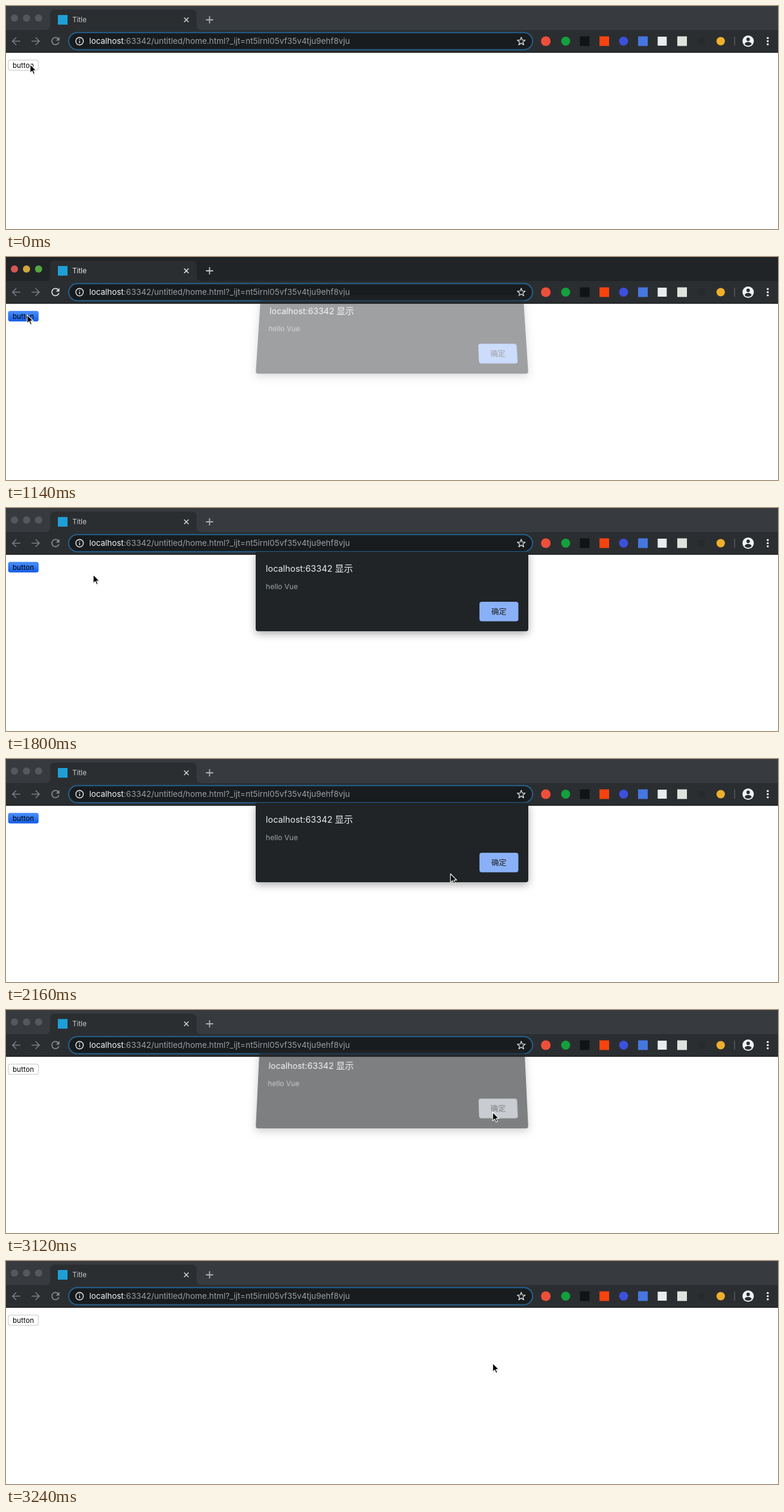
Recreate the animation shown at these times as an HTML page. Size 1280x371 px, loop 3300 ms.

```html
<!DOCTYPE html>
<html lang="zh-CN">
<head>
<meta charset="utf-8">
<title>Title</title>
<style>
  html, body { margin: 0; width: 100%; height: 100%; overflow: hidden; background: #fff; }
  svg { position: absolute; left: 0; top: 0; display: block; overflow: visible; }
  text { font-family: Inter, "Noto Sans CJK SC", "Noto Sans CJK", sans-serif; white-space: pre; }
  #dialog {
    position: absolute; left: 414px; top: 73px; width: 452px; height: 132px;
    background: #202426; border-radius: 0 0 4px 4px;
    box-shadow: 0 4px 14px rgba(0, 0, 0, .34);
    transform-origin: 50% 100%;
  }
</style>
</head>
<body>
<svg width="1280" height="371" viewBox="0 0 1280 371">
  <defs>
    <linearGradient id="blue" x2="0" y2="1">
      <stop offset="0" stop-color="#4a90fb"/>
      <stop offset="1" stop-color="#155ce6"/>
    </linearGradient>
  </defs>
  <rect width="1280" height="371" fill="#fff"/>

  <rect id="strip" width="1280" height="40"/>
  <g id="lights"></g>
  <rect y="40" width="1280" height="37" fill="#2b2e31"/>
  <rect y="76.5" width="1280" height="1.3" fill="#131516"/>
  <path id="tab" d="M65 40q8 0 8-8V14q0-8 8-8H308q8 0 8 8V32q0 8 8 8Z" fill="#2b2e31"/>
  <rect x="86" y="15" width="16" height="16" fill="#1e9fd8"/>
  <text id="tabName" x="110" y="27.2" font-size="11.6">Title</text>
  <path id="close" d="M295.3 19.3l7.4 7.4m0-7.4l-7.4 7.4" stroke-width="1.5"/>
  <path id="plus" d="M331.5 23h12M337.5 17v12" stroke-width="1.8"/>

  <g fill="none" stroke="#7c8084" stroke-width="1.6">
    <path d="M23.5 58.5H11.2M17 52.3l-6.2 6.2 6.2 6.2"/>
    <path d="M42.5 58.5H54.8M49 52.3l6.2 6.2-6.2 6.2"/>
  </g>
  <g id="reload">
    <path d="M86.4 54.2A6 6 0 1 0 87.8 60" fill="none" stroke-width="1.7"/>
    <path d="M88.6 51.6v6h-6z" stroke="none"/>
  </g>

  <rect x="104" y="44.3" width="769" height="28.4" rx="14.2" fill="#191c1e" stroke="#24608e" stroke-width="2"/>
  <g stroke="#eceef0" fill="none" stroke-width="1.4">
    <circle cx="122" cy="58.5" r="6.2"/>
    <path d="M122 57.8v4M122 54.8v1.5"/>
  </g>
  <text x="138" y="63.4" font-size="13.4" fill="#9a9fa4"><tspan fill="#f3f4f5">localhost</tspan>:63342/untitled/home.html?_ijt=nt5irnl05vf35v4tju9ehf8vju</text>
  <path id="star" fill="none" stroke="#dfe1e3" stroke-width="1.3" stroke-linejoin="round"/>

  <g id="badges"></g>
  <path d="M1208 51v15" stroke="#64686c" stroke-width="1.2"/>
  <circle cx="1230.5" cy="58.5" r="9.4" fill="#f1f2f3"/>
  <g fill="#2b2e31">
    <circle cx="1230.5" cy="55.4" r="2.9"/>
    <path d="M1224.7 63.4q1-3.6 5.8-3.6t5.8 3.6q-2.2 2.6-5.8 2.6t-5.8-2.6Z"/>
  </g>
  <g fill="#eceef0">
    <circle cx="1263" cy="53.3" r="1.7"/>
    <circle cx="1263" cy="58.5" r="1.7"/>
    <circle cx="1263" cy="63.7" r="1.7"/>
  </g>

  <rect id="face" x="3.8" y="90" width="50" height="17" rx="3"/>
  <text x="11" y="102.8" font-size="11.6" fill="#000">button</text>
</svg>

<div id="dialog">
  <svg width="452" height="132" viewBox="0 0 452 132">
    <text x="16.8" y="32.8" font-size="14.4" fill="#eceef0">localhost:63342 <tspan font-size="15">显示</tspan></text>
    <text x="16.8" y="62" font-size="12.1" fill="#9da2a7">hello Vue</text>
    <rect id="ok" x="371" y="83" width="64.5" height="32.5" rx="4"/>
    <text x="403.2" y="103.8" font-size="12.5" font-weight="500" text-anchor="middle" fill="#202124">确定</text>
  </svg>
</div>

<svg width="1280" height="371" viewBox="0 0 1280 371">
  <g id="cursor">
    <path d="M0 0V14.4L3.3 11.3 5.5 16.4 7.8 15.4 5.6 10.4H10.2Z" transform="translate(0 1.4)" fill="#000" opacity=".18"/>
    <path d="M0 0V14.4L3.3 11.3 5.5 16.4 7.8 15.4 5.6 10.4H10.2Z" fill="#000" stroke="#fff" stroke-width="1.1" stroke-linejoin="round"/>
  </g>
</svg>

<script>
const LOOP = 3300, STEP = 60;
const NS = 'http://www.w3.org/2000/svg';
const $ = id => document.getElementById(id);
const clamp = v => Math.min(1, Math.max(0, v));
const span = (t, a, b) => clamp((t - a) / (b - a));
const lerp = (a, b, p) => a + (b - a) * p;
const smooth = p => p * p * (3 - 2 * p);
const mix = (a, b, p) => `rgb(${a.map((v, i) => Math.round(lerp(v, b[i], p)))})`;

function add(parent, tag, attrs) {
  const el = document.createElementNS(NS, tag);
  for (const k in attrs) el.setAttribute(k, attrs[k]);
  return parent.appendChild(el);
}

const lightColors = [[252, 86, 80], [247, 192, 46], [85, 192, 56]];
const lights = lightColors.map((c, i) => add($('lights'), 'circle', { cx: 14 + 20 * i, cy: 20, r: 6 }));

// Toolbar badges: centre x, shape, size, colour
[
  [895, 'o', 16, '#ee4f3b'], [928, 'o', 15, '#14a03c'], [959.5, 's', 16, '#111314'],
  [992, 's', 16, '#f8430f'], [1024, 'o', 15, '#3c50dc'], [1056, 's', 16, '#4677e0'],
  [1088, 's', 15, '#e9ebec'], [1121, 's', 16, '#dfe3de'], [1153, 's', 11, '#272a2d'],
  [1185, 'o', 14, '#eeb02c']
].forEach(([x, shape, d, fill]) => shape === 'o'
  ? add($('badges'), 'circle', { cx: x, cy: 58.5, r: d / 2, fill })
  : add($('badges'), 'rect', { x: x - d / 2, y: 58.5 - d / 2, width: d, height: d, fill }));

const starPoints = Array.from({ length: 10 }, (_, i) => {
  const r = i % 2 ? 2.9 : 7, a = (i / 5 - .5) * Math.PI;
  return `${(854.3 + r * Math.cos(a)).toFixed(2)} ${(59 + r * Math.sin(a)).toFixed(2)}`;
});
$('star').setAttribute('d', `M${starPoints.join('L')}Z`);

// Pointer stops: time, x, y
const stops = [
  [0, 40, 97], [840, 40, 97], [1020, 35, 96], [1680, 35, 96],
  [2160, 737, 191], [2220, 746, 189], [2760, 807, 170], [LOOP, 807, 170]
];

function pointer(t) {
  const i = stops.findIndex(s => s[0] > t);
  const [t0, x0, y0] = stops[i - 1], [t1, x1, y1] = stops[i];
  const p = smooth(span(t, t0, t1));
  return [lerp(x0, x1, p), lerp(y0, y1, p)];
}

function drawWindow(active) {
  $('strip').setAttribute('fill', mix([55, 58, 62], [26, 28, 31], active));
  lights.forEach((el, i) => el.setAttribute('fill', mix([86, 89, 92], lightColors[i], active)));
  $('tabName').setAttribute('fill', mix([203, 206, 209], [246, 247, 248], active));
  $('close').setAttribute('stroke', mix([214, 216, 218], [246, 247, 248], active));
  $('plus').setAttribute('stroke', mix([172, 175, 178], [200, 202, 205], active));
  const ink = mix([134, 137, 140], [246, 247, 248], active);
  $('reload').setAttribute('stroke', ink);
  $('reload').setAttribute('fill', ink);
}

function drawDialog(t) {
  const closing = t >= 2940;
  const u = closing ? span(t, 2940, 3220) : 1 - span(t, 1080, 1320);
  const away = u * u;
  const box = $('dialog').style;
  box.visibility = away < 1 ? 'visible' : 'hidden';
  box.opacity = 1 - away;
  // Sheet tips backwards: the top edge narrows while the whole lifts
  box.transform = away ? `translateY(${-19.4 * away}px) matrix3d(1,0,0,0, 0,${1 + .0533 * away},0,${-.00053 * away}, 0,0,1,0, 0,0,0,1)` : 'none';
  $('ok').setAttribute('fill', mix([138, 176, 247], [162, 167, 174], closing ? clamp(away / .4) : 0));
}

function draw(now) {
  const t = Math.floor((now % LOOP) / STEP) * STEP;
  drawWindow(t < 900 ? span(t, 0, 360) : 1 - span(t, 1080, 1320));
  drawDialog(t);

  const pressed = t >= 1020 && t < 3060;
  $('face').setAttribute('fill', pressed ? 'url(#blue)' : '#fff');
  $('face').setAttribute('stroke', pressed ? '#2467df' : '#c3c3c3');
  $('face').setAttribute('stroke-width', pressed ? .5 : 1);

  const [x, y] = pointer(t);
  $('cursor').setAttribute('transform', `translate(${x.toFixed(2)} ${y.toFixed(2)})`);
}

let start;
function frame(now) {
  start ??= now;
  draw(Math.max(0, now - start));
  requestAnimationFrame(frame);
}
draw(0);
requestAnimationFrame(frame);
</script>
</body>
</html>
```
